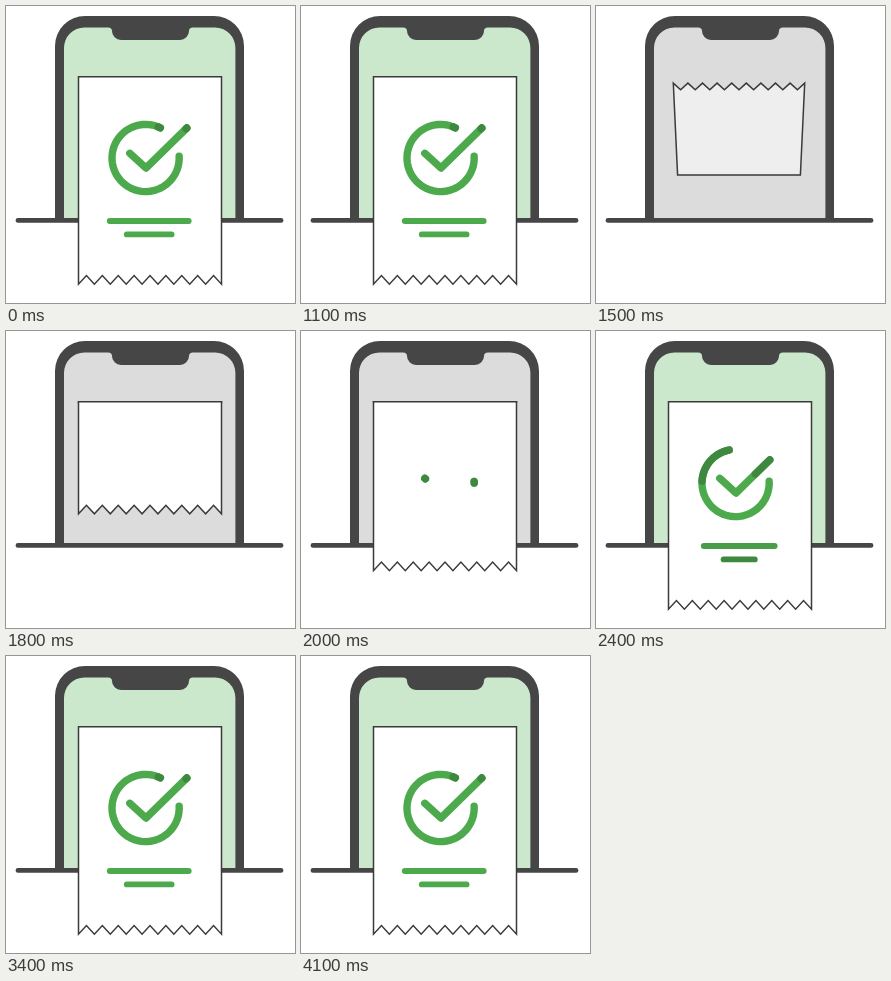
Recreate the animation shown at these times as an HTML page. Size 289 by 297 pixels, loop 4.2 s.

```html
<!DOCTYPE html>
<html lang="en">
<head>
<meta charset="utf-8">
<title>Receipt</title>
<style>
html, body { margin: 0; width: 100%; height: 100%; overflow: hidden; background: #fff; }
svg { display: block; width: 100vw; height: 100vh; }
.ink { fill: none; stroke: #4ca94c; stroke-linecap: round; stroke-linejoin: round; }
.tip { stroke: #3f883f; }
</style>
</head>
<body>
<svg viewBox="0 0 289 297">
  <path id="screen" d="M53 214V40Q53 16 77 16H210Q234 16 234 40V214Z"/>
  <path fill="#464646" d="M49 214V40A30 30 0 0 1 79 10H208A30 30 0 0 1 238 40V214H229.4V42A20.4 20.4 0 0 0 209 21.5H187Q183 21.5 183 25A9 9 0 0 1 174 34H115A9 9 0 0 1 106 25Q106 21.5 102 21.5H78.4A20.4 20.4 0 0 0 58 42V214Z"/>
  <path d="M12 214.4H275" stroke="#464646" stroke-width="4.8" stroke-linecap="round"/>
  <g stroke="#3a3a3a" stroke-width="1.5" stroke-linejoin="miter">
    <path id="back" fill="#eee"/>
    <path id="front" fill="#fff"/>
  </g>
  <g id="marks" class="ink" stroke-width="7.4">
    <path id="ring"/>
    <path id="ringTip" class="tip"/>
    <path id="check"/>
    <path id="checkTip" class="tip"/>
    <path id="bar1" stroke-width="6"/>
    <path id="bar2" stroke-width="5.8"/>
  </g>
</svg>
<script>
const LOOP = 4200, CUT = 1200, FOLD = 1540, DRAW = 2000;
const MID = 144, BACK = 143, TOP = 70.7, SLOT = 169, END = 278.2, TEETH = 9;
const DARK = [63, 136, 63], LIGHT = [76, 169, 76];
const GREY = [220, 220, 220], MINT = [203, 232, 204];
const $ = id => document.getElementById(id);
const clamp = (v, a = 0, b = 1) => Math.min(b, Math.max(a, v));
const span = (t, a, b) => clamp((t - a) / (b - a));
const mix = (a, b, k) => a + (b - a) * k;
const blend = (a, b, k) => `rgb(${a.map((v, i) => Math.round(mix(v, b[i], k)))})`;
const ease = u => (1 - Math.cos(Math.PI * u)) / 2;
const set = (id, d) => $(id).setAttribute('d', d);
const poly = pts => 'M' + pts.map(p => p.map(v => v.toFixed(2)).join(' ')).join('L');

// Torn edge running from left to right; odd points are the notches.
function teeth(mid, half, y, depth, lo, hi) {
  return Array.from({ length: TEETH * 2 + 1 }, (_, i) =>
    [mid - half + half * i / TEETH, clamp(y + (i % 2 ? depth : 0), lo, hi)]);
}

function arc(from, to) {
  const n = 60;
  return poly(Array.from({ length: n + 1 }, (_, i) => {
    const a = (-3 + 299 * mix(from, to, i / n)) * Math.PI / 180;
    return [139.6 + 33.6 * Math.cos(a), 152 + 33.6 * Math.sin(a)];
  }));
}

function tick(from, to) {
  const bend = 0.28;
  const at = p => p < bend
    ? [mix(123.8, 140, p / bend), mix(147.3, 162, p / bend)]
    : [mix(140, 180.8, (p - bend) / (1 - bend)), mix(162, 122, (p - bend) / (1 - bend))];
  const pts = [at(from)];
  if (from < bend && to > bend) pts.push(at(bend));
  return poly([...pts, at(to)]);
}

// Bars grow from the middle and brighten as they settle.
function bar(id, y, half, k) {
  set(id, k > 0 ? `M${MID - 0.8 - half * k} ${y}h${2 * half * k}` : '');
  $(id).setAttribute('stroke', blend(DARK, LIGHT, span(k, 0.7, 1)));
}

function paper(t) {
  const rise = span(t, CUT, FOLD - 18);
  const drop = span(t, FOLD, 2350);
  const turn = clamp(drop * 6);
  const half = mix(61.4 + 4.6 * rise, 71.5, turn);
  const mid = mix(BACK, MID, turn);
  const y = mix(SLOT, TOP, rise);
  const slot = [[BACK + 61.4, SLOT], [BACK - 61.4, SLOT]];
  const hinge = [[mid + half, TOP], [mid - half, TOP]];
  const edge = drop ? [hinge[1], hinge[0]] : teeth(mid, half, y, 6.6, TOP, SLOT);
  set('back', rise > 0 && drop < 0.8 ? poly([...edge, ...slot]) + 'Z' : '');
  const low = mix(TOP, END, 1 - (1 - drop) ** 2);
  set('front', drop ? poly([...hinge, ...teeth(mid, half, low, -8.6, TOP, END)]) + 'Z' : '');
}

function marks(t) {
  $('marks').style.display = t < DRAW ? 'none' : '';
  if (t < DRAW) return;
  const grow = x => Math.max(0.01, ease(span(x, DRAW, 2520)));
  const p = grow(t);
  const tail = Math.min(grow(t - 100), p - 0.008, 0.987);
  set('ring', arc(0, p));
  set('ringTip', arc(tail, p));
  set('check', tick(0, p));
  set('checkTip', tick(tail, p));
  bar('bar1', 215, 39.4, ease(span(t, 2100, 2480)));
  bar('bar2', 228.4, 22.4, ease(span(t, 2200, 2520)));
}

function draw(time) {
  let t = time % LOOP;
  // The finished receipt holds until the cut.
  if (t < CUT) t += LOOP;
  $('screen').setAttribute('fill', blend(GREY, MINT, span(t, 2030, 2400)));
  paper(t);
  marks(t);
}

const start = performance.now();
function frame(now) {
  draw(Math.max(0, now - start));
  requestAnimationFrame(frame);
}
draw(0);
requestAnimationFrame(frame);
</script>
</body>
</html>
```
